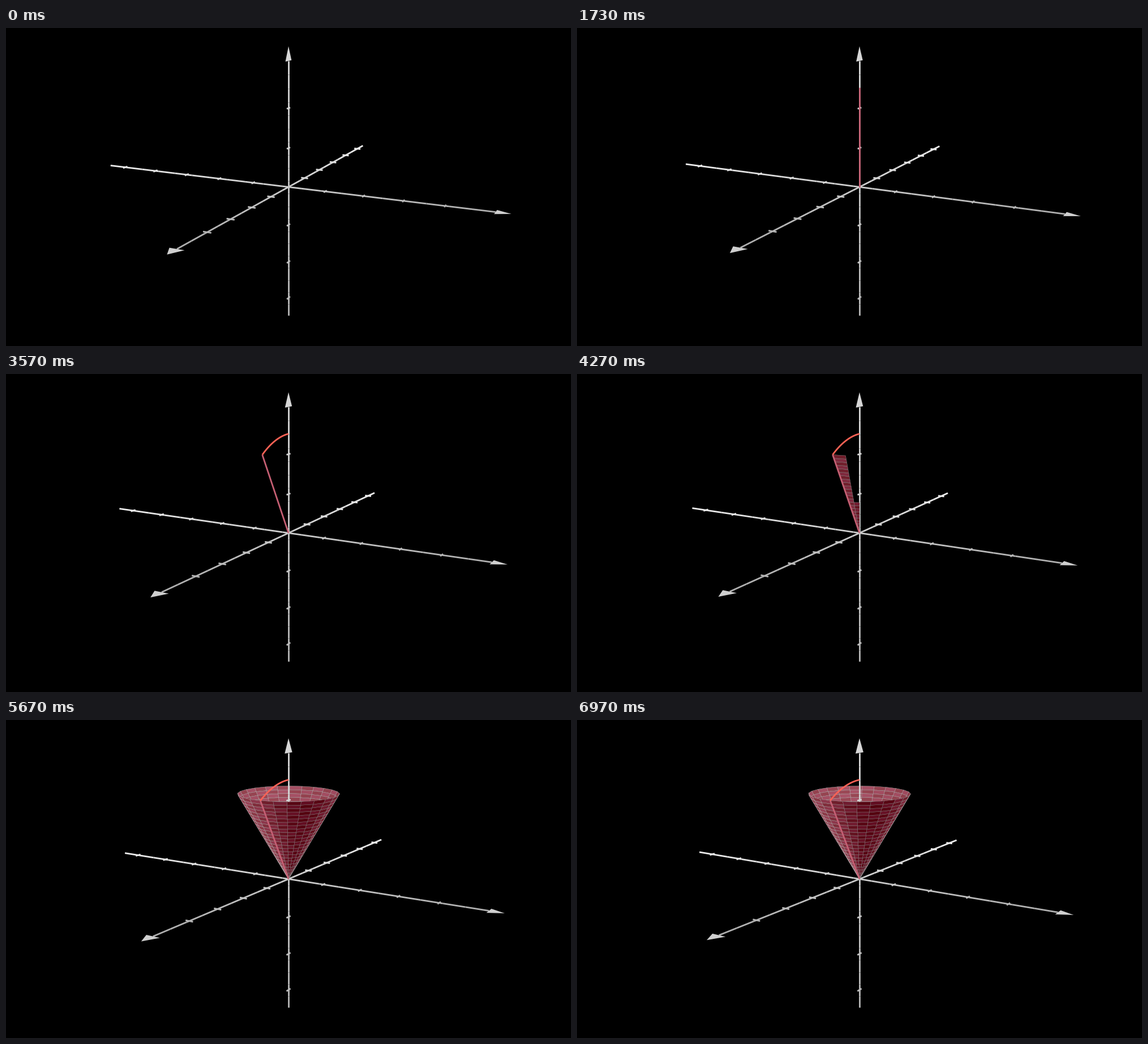
Recreate the animation shown at these times as a matplotlib script. Size 998 by 561 pixels, loop 7.01 s.

```python
import matplotlib.pyplot as plt
import numpy as np
from matplotlib.animation import FuncAnimation
from matplotlib.collections import LineCollection, PolyCollection

W, H, DPI = 998, 561, 64
LOOP, FRAMES, FPS = 7010, 210, 30
UNIT = H / 8
PX = 72 / DPI
STROKE = 2.8 * PX

PHI, THETA0, SPIN, FOCAL = np.radians(75), np.radians(25), 0.02, 20
LENGTH, TILT = 2.5, np.radians(30)
SUN = np.array([-7, -9, 10])
MAROON = np.array([[0xA2, 0x4D, 0x61], [0x94, 0x42, 0x4F]]) / 255
GREY = 0xBB / 255
RES = 24


def smooth(t):
    """Sigmoid easing, exact at both ends."""
    t = np.clip(t, 0, 1)
    edge = 1 / (1 + np.exp(5))
    return float(np.clip((1 / (1 + np.exp(-10 * (t - 0.5))) - edge) / (1 - 2 * edge), 0, 1))


def project(pts, theta):
    """World points to stage pixels, plus depth towards the camera."""
    x, y, z = np.moveaxis(np.asarray(pts, float), -1, 0)
    right = -x * np.sin(theta) + y * np.cos(theta)
    back = -x * np.cos(theta) - y * np.sin(theta)
    up = back * np.cos(PHI) + z * np.sin(PHI)
    depth = -back * np.sin(PHI) + z * np.cos(PHI)
    s = UNIT * FOCAL / (FOCAL - depth)
    return np.stack([W / 2 + right * s, H / 2 - up * s], -1), depth


def on_arc(a):
    return LENGTH * np.stack([np.sin(a), 0 * a, np.cos(a)], -1)


class Axis:
    """Shaded axis with ticks and a flat arrow tip."""

    def __init__(self, ax, along, across, half, dark, light, tip_tone, zorder):
        along, across = np.eye(3)[along], np.eye(3)[across]
        ends = np.linspace(-half, half - 0.35, 21)
        marks = np.array([m for m in np.arange(-int(half), int(half)) if m])
        pieces = np.stack([ends[:-1, None] * along, ends[1:, None] * along], 1)
        ticks = marks[:, None, None] * along + np.array([[-0.1], [0.1]]) * across
        self.segs = np.concatenate([pieces, ticks])
        base = (half - 0.35) * along
        self.tip = np.array([[half * along, base + 0.175 * across, base - 0.175 * across]])

        place = np.concatenate([(ends[:-1] + ends[1:]) / 2, marks]) / (2 * half) + 0.5
        tones = dark + (light - dark) * place
        self.lines = LineCollection([], colors=np.repeat(tones[:, None], 3, 1),
                                    linewidths=STROKE, zorder=zorder, capstyle="butt")
        self.head = PolyCollection([], facecolors=[(tip_tone,) * 3], linewidths=0, zorder=zorder)
        ax.add_collection(self.lines, autolim=False)
        ax.add_collection(self.head, autolim=False)

    def update(self, theta):
        self.lines.set_segments(project(self.segs, theta)[0])
        self.head.set_verts(project(self.tip, theta)[0])


class Cone:
    """Checkered surface, built one wedge after another."""

    def __init__(self, ax):
        i, j = np.divmod(np.arange(RES * RES), RES)
        ii = np.stack([i, i + 1, i + 1, i], 1)
        jj = np.stack([j, j, j + 1, j + 1], 1)
        az, r = ii * 2 * np.pi / RES, jj * LENGTH / RES
        self.verts = np.stack([r * np.sin(TILT) * np.cos(az),
                               r * np.sin(TILT) * np.sin(az),
                               r * np.cos(TILT)], -1)
        self.az = (i + 0.5) * 2 * np.pi / RES
        normal = np.stack([np.cos(self.az) * np.cos(TILT),
                           np.sin(self.az) * np.cos(TILT),
                           np.full(len(i), -np.sin(TILT))], -1)
        to_sun = SUN - self.verts.mean(1)
        to_sun /= np.linalg.norm(to_sun, axis=1, keepdims=True)
        glow = 0.5 * (normal * to_sun).sum(1) ** 3
        glow = np.where(glow < 0, glow / 2, glow)[:, None]
        self.fill = np.clip(MAROON[(i + j) % 2] + glow, 0, 1)
        self.edge = np.clip(np.full((len(i), 3), GREY) + glow, 0, 1)
        self.layers = [PolyCollection([], linewidths=0.42 * PX, zorder=z) for z in (2, 4)]
        for layer in self.layers:
            layer.set_snap(False)
            ax.add_collection(layer, autolim=False)

    def update(self, theta, amount):
        flat, depth = project(self.verts, theta)
        order = np.argsort(depth.mean(1))
        order = order[order < round(amount * RES * RES)]
        front = np.cos(self.az[order] - theta) > 0
        for layer, mask in zip(self.layers, (~front, front)):
            pick = order[mask]
            layer.set_visible(len(pick) > 0)
            if len(pick):
                layer.set_verts(flat[pick])
                layer.set_facecolor(self.fill[pick])
                layer.set_edgecolor(self.edge[pick])


fig = plt.figure(figsize=(W / DPI, H / DPI), dpi=DPI, facecolor="black")
ax = fig.add_axes([0, 0, 1, 1])
ax.set(xlim=(0, W), ylim=(H, 0))
ax.axis("off")

axes = [Axis(ax, 0, 1, 5.5, 0.672, 0.933, 0.81, 1),
        Axis(ax, 1, 0, 5.5, 0.677, 0.933, 0.81, 1),
        Axis(ax, 2, 0, 3.5, 0.72, 0.86, 0.84, 3)]
for a in axes[:2]:
    # x and y brighten towards their negative ends
    a.lines.set_color(0.672 + 0.933 - a.lines.get_color()[:, :3])
cone = Cone(ax)
ray, = ax.plot([], [], color="#C55F73", lw=STROKE, solid_capstyle="butt", zorder=6)
arc, = ax.plot([], [], color="#FC6255", lw=STROKE, solid_capstyle="butt", zorder=7)


def draw(k):
    t = k / FPS
    theta = THETA0 + SPIN * t
    for a in axes:
        a.update(theta)
    cone.update(theta, smooth(t - 4))

    grow, lean = smooth(t), smooth(t - 2)
    start, end = on_arc(np.array([0, TILT]))
    tip = grow * (start + (end - start) * lean)
    ray.set_data(*project([np.zeros(3), tip], theta)[0].T)
    ray.set_visible(grow > 0)
    arc.set_data(*project(on_arc(np.linspace(0, TILT * lean, 40)), theta)[0].T)
    arc.set_visible(lean > 0)
    return []


anim = FuncAnimation(fig, draw, frames=FRAMES, init_func=lambda: draw(0),
                     interval=LOOP / FRAMES, repeat=True, repeat_delay=0, blit=False)
plt.show()
```
